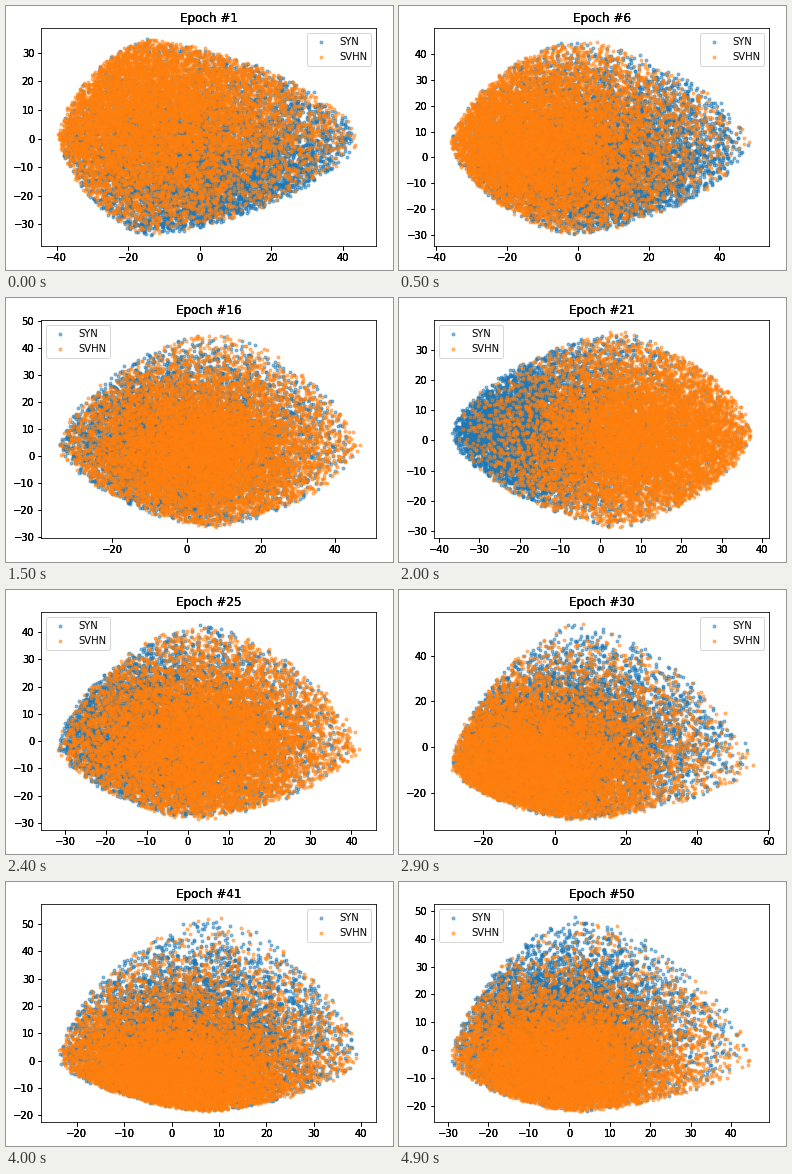
Animation of 387x264 px, one loop 5 s. Source, as a matplotlib script:

```python
import numpy as np
import matplotlib.pyplot as plt
from matplotlib.animation import FuncAnimation

W, H, DPI = 387, 264, 72
BOX = [35.3 / W, 24.2 / H, 334.8 / W, 217.44 / H]
EPOCHS = 50
COUNTS = {"SYN": 8000, "SVHN": 10000}
MARGIN = 0.05
ROUNDNESS = 1.5

poses = []


def pose(epoch, x_range, y_range, apex, spread, syn, svhn, legend="upper right"):
    """Data ranges, then the outline's apex and the two modes as range fractions."""
    values = np.array([*x_range, *y_range, *apex, spread, *syn, *svhn])
    poses.append((epoch, values, legend))


pose(1, (-40, 45), (-34, 35), (.30, .50), .33, (.50, .30), (.25, .65))
pose(11, (-32, 57), (-28, 59), (.45, .42), .19, (.48, .40), (.22, .36))
pose(21, (-37.4, 38), (-29, 36.5), (.55, .48), .25, (.22, .50), (.66, .45),
     "upper left")
pose(30, (-29.5, 56), (-32, 54.7), (.42, .27), .24, (.35, .38), (.25, .25))
pose(36, (-51.6, 98.4), (-35.3, 61), (.50, .21), .17, (.42, .38), (.27, .27))
pose(41, (-24.3, 40), (-18.8, 53.6), (.50, .27), .26, (.40, .30), (.35, .08))
pose(50, (-29.6, 45.6), (-22, 48.7), (.42, .26), .21, (.33, .40), (.35, .20),
     "upper left")


def state(epoch, rng):
    """Blend the neighbouring poses; epochs in between also wander a little."""
    k = min(sum(p[0] <= epoch for p in poses), len(poses) - 1)
    (e0, v0, legend0), (e1, v1, legend1) = poses[k - 1:k + 1]
    f = (epoch - e0) / (e1 - e0)
    values = v0 + (v1 - v0) * f
    if 0 < f < 1:
        values *= rng.uniform(0.92, 1.08, len(values))
    return values, legend0 if f < 0.5 else legend1


def cloud(rng, mode, spread, apex, count):
    """Heavy-tailed bell around mode, cut off by a rounded outline in the unit box."""
    n = 3 * count
    tails = np.sqrt(6 / rng.chisquare(6, (n, 1)))
    p = mode + spread * rng.normal(size=(n, 2)) * tails
    reach = np.where(p < apex, apex, 1 - apex)
    depth = (np.abs(p - apex) / reach) ** ROUNDNESS
    inside = depth.sum(axis=1) < 1 - rng.exponential(0.06, n)
    return p[inside][:count]


fig = plt.figure(figsize=(W / DPI, H / DPI), dpi=DPI, facecolor="white")
ax = fig.add_axes(BOX)
# Stacked copies of the labels give the heavy lettering.
overlays = [fig.add_axes(BOX, frameon=False, label=f"labels {i}")
            for i in range(2)]
dots = {name: ax.plot([], [], ".", alpha=0.5, label=name)[0]
        for name in COUNTS}


def draw(frame):
    epoch = frame + 1
    rng = np.random.default_rng(epoch)
    values, legend = state(epoch, rng)
    low, high = values[0:4:2], values[1:4:2]
    apex, spread = values[4:6], values[6]
    modes = values[7:9], values[9:11]
    size = high - low
    first, last = low - MARGIN * size, high + MARGIN * size

    for axes in (ax, *overlays):
        axes.set_xlim(first[0], last[0])
        axes.set_ylim(first[1], last[1])
        axes.set_title(f"Epoch #{epoch}", fontsize=12)
    for (name, count), mode in zip(COUNTS.items(), modes):
        points = low + size * cloud(rng, mode, spread, apex, count)
        dots[name].set_data(*points.T)
    ax.legend(loc=legend)
    return list(dots.values())


anim = FuncAnimation(fig, draw, frames=EPOCHS, init_func=lambda: draw(0),
                     interval=100, repeat=True, repeat_delay=0, blit=False)
plt.show()
```
